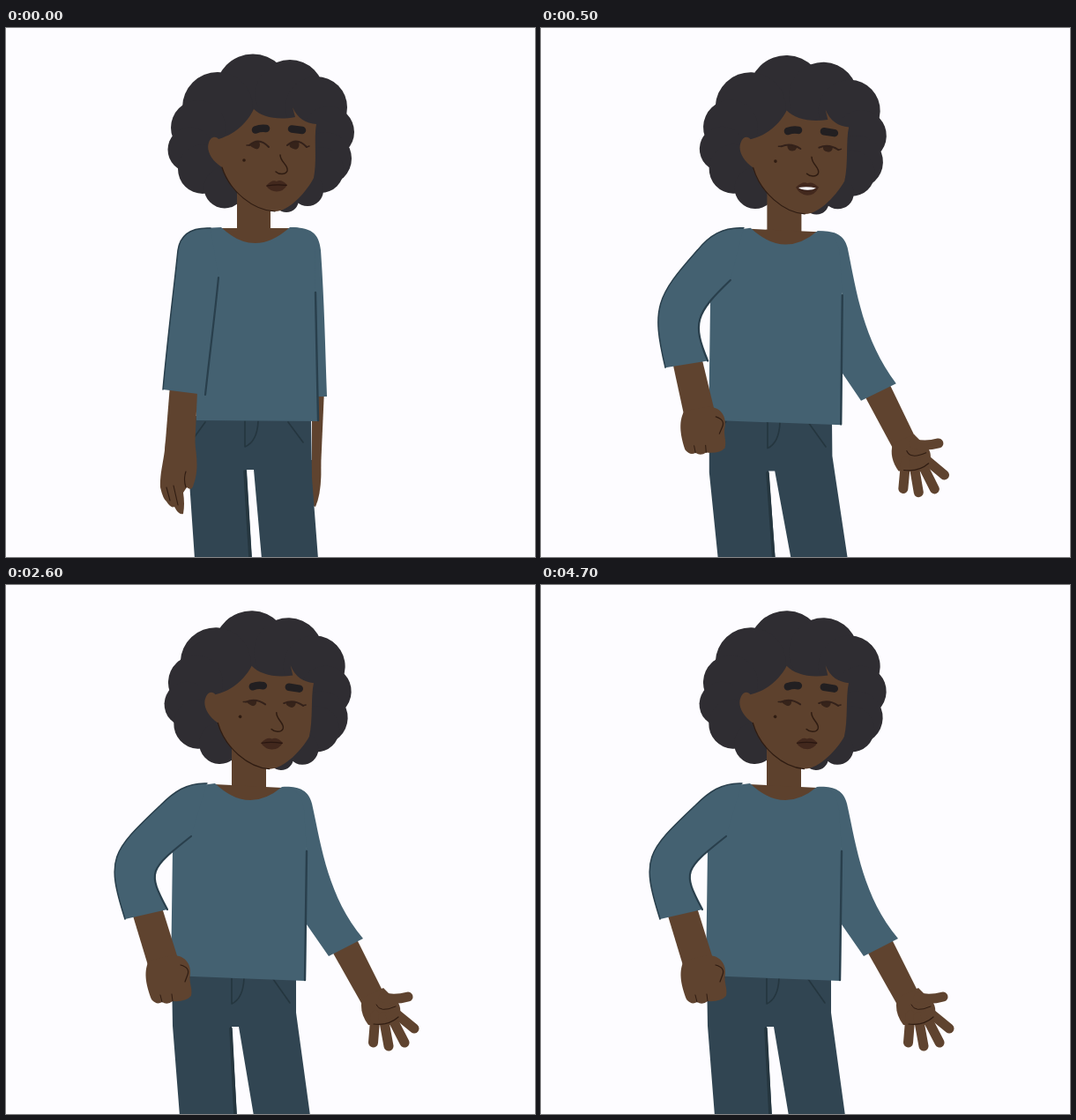
An HTML page that plays this animation: 600 px wide and 600 px high, repeating every 5.1 s.

```html
<!DOCTYPE html>
<html lang="en">
<head>
<meta charset="utf-8">
<title>Talking woman</title>
<style>
  html, body { margin: 0; width: 100%; height: 100%; overflow: hidden; background: #fdfcff; }
  svg { display: block; width: 100vw; height: 100vh; }
  path { stroke-linecap: round; stroke-linejoin: round; }
</style>
</head>
<body>
<svg id="stage" viewBox="0 0 600 600"></svg>
<script>
const LOOP = 5100, STEP = 100;
const HAIR = '#2f2d32', SKIN = '#5d412d', ARM = '#5f432f', SHIRT = '#446171', PANTS = '#314552';
const SEAM = '#293f4c', CREASE = '#25363f', INK = '#2f1c12';

// Each part has three poses: standing, dipping, hand on hip.
const poses = {
  rArm: ['M347 410L361 410L357 500L347 500Z', 'M354 420L384 410L412 476L385 490Z', 'M369 414L398 402L429 464L404 476Z'],
  rSleeve: [
    'M322 226C345 226 355 232 357 252C361 310 362 360 364 418L354 418L353 380L351 300Z',
    'M316 235C336 236 346 239 350 253C357 300 364 350 394 412L351 430L345 417L345 308Z',
    'M313 229C331 228 343 232 347 248C357 292 364 352 405 401L366 421L341 385L341 300Z'],
  pants: [
    'M215 440L207 500L214 602L279 602L273 501L281 501L290 602L354 602L347 510L346 440Z',
    'M202 448L198 520L216 602L281 602L267 509L270 509L294 602L359 602L336 488L334 450Z',
    'M188 440L189 500L197 602L262 602L256 501L264 501L281 602L345 602L329 485L329 445Z'],
  legLine: ['M271 503L277 602', 'M265 511L279 602', 'M255 503L260 602'],
  leftPocket: ['M226 447L213 465', 'M217 453L202 471', 'M208 445L190 466'],
  fly: ['M271 446L271 475Q285 469 286 446', 'M261 454L261 483Q274 477 275 454', 'M256 446L256 475Q269 469 270 446'],
  rightPocket: ['M320 447L337 470', 'M310 457L327 479', 'M303 447L322 474'],
  neck: ['M262 175L300 175L300 240L262 240Z', 'M258 183L297 183L297 248L258 248Z', 'M256 175L295 175L295 240L256 240Z'],
  collar: ['M243 227Q282 263 323 227Z', 'M239 235Q280 269 317 236Z', 'M236 226Q275 262 314 230Z'],
  torso: [
    'M244 226L225 227L212 300L216 445L355 446L351 300L350 250C348 232 340 226 322 226Q282 262 244 226Z',
    'M240 234L220 237L205 300L203 452L345 455L345 308L342 255C340 241 332 236 316 235Q280 268 240 234Z',
    'M237 225L215 228L189 300L187 443L340 449L341 300L338 255C336 238 328 229 313 229Q275 261 237 225Z'],
  side: ['M351 300L354 445', 'M345 308L345 454', 'M341 302L339 448'],
  lArm: ['M186 405L217 412L214 480L180 480Z', 'M174 408L205 412L203 480L167 480Z', 'M143 372L177 366L197 430L163 438Z'],
  lOuter: [
    'M232 227C212 226 198 232 195 252C190 300 184 345 178 410',
    'M238 234C208 231 192 240 189 258C178 310 172 345 165 410',
    'M228 225C205 224 190 235 175 250C119 303 113 310 135 379'],
  lInner: [
    'M226 416C231 370 237 325 241 283',
    'M214 416C217 375 225 330 234 290',
    'M183 368C160 325 162 323 210 285'],
  head: ['0 0 0', '-2.5 8.5 .6', '-3 0 2'],
  openHand: ['-70 42 40', '-25.5 17.5 3', '0 0 0'],
  sideHand: ['0 0 0', '50 -15 -20', '50 -15 -20'],
  fist: ['10 44 14', '-2 46 14', '0 0 0'],
  hang: ['0 0 0', '-12 3 0', '-12 3 0']
};

// [step, pose position]
const moves = [[0, 0], [1, .2], [2, .65], [3, 1], [4, 1.45], [5, 1.8], [6, 1.96],
  [7, 1.98], [8, 1.99], [10, 1.995], [11, 2]];
// [step, half width, opening]
const mouths = [[0, 12, 0], [2, 14, 3], [3, 15, 5], [4, 14, 4], [5, 13, 2], [6, 12, 0],
  [14, 13, 3], [15, 15, 5], [16, 13, 7], [17, 14, 4], [18, 16, 2], [19, 14, 5],
  [20, 13, 6], [21, 13, 7], [22, 14, 5], [23, 15, 3], [24, 13, .8], [26, 12.5, .3], [28, 12, 0],
  [30, 14, 1.5], [31, 16, 2.5], [32, 16, 2], [33, 15, 4], [34, 13, 7], [35, 14, 5],
  [36, 13, 6], [37, 13, 7], [38, 14, 5], [39, 15, 3], [40, 14, 2], [41, 13, 1],
  [42, 13, .7], [43, 12.5, .5], [45, 12, .2], [47, 12, 0]];

const svg = document.getElementById('stage');
function add(tag, attrs, parent = svg) {
  const el = document.createElementNS('http://www.w3.org/2000/svg', tag);
  for (const k in attrs) el.setAttribute(k, attrs[k]);
  return parent.appendChild(el);
}
const group = (parent) => add('g', {}, parent);
const fill = (color, parent, d = '') => add('path', { d, fill: color }, parent);
const line = (color, width, parent, d = '') =>
  add('path', { d, fill: 'none', stroke: color, 'stroke-width': width }, parent);
const dot = (cx, cy, r, color, parent) => add('circle', { cx, cy, r, fill: color }, parent);

const el = {};
el.rArm = fill(ARM);

const sideHand = group();
fill(ARM, sideHand, 'M345 490L357 490Q359 525 351 543L343 540Z');

const openHand = group();
fill(ARM, openHand, 'M404 468Q400 485 411 499L441 499Q451 485 445 474L428 457Z');
for (const d of ['M419 488L416.500 519', 'M428 490L434 523', 'M436 488L452 519', 'M441 485L463 503'])
  line(ARM, 11, openHand, d);
line(ARM, 11, openHand, 'M428 468Q442 471 456 467');
line(INK, 1.2, openHand, 'M417 498Q434 500 445 490');
line(INK, 1, openHand, 'M420 476Q424 486 442 478');

el.rSleeve = fill(SHIRT);
el.pants = fill(PANTS);
el.legLine = line(CREASE, 3.5);
for (const k of ['leftPocket', 'fly', 'rightPocket']) el[k] = line(CREASE, 1.6);

const hair = group();
add('ellipse', { cx: 290, cy: 120, rx: 80, ry: 62, fill: HAIR }, hair);
[[280, 72, 42.5], [322, 75, 39], [352, 90, 35], [366, 118, 29], [362, 148, 30], [357, 161, 26],
 [342, 184, 18], [318, 195, 14], [240, 90, 40], [218, 113, 31], [209, 138, 25.5], [223, 160, 28],
 [248, 181, 23.5]].forEach(([x, y, r]) => dot(x, y, r, HAIR, hair));

el.neck = fill(SKIN);
el.collar = fill(SKIN);
el.torso = fill(SHIRT);
el.side = line(SEAM, 2.4);
el.lArm = fill(ARM);

const hang = group();
fill(ARM, hang, 'M181 468C180 488 174 505 175 521Q178 534 182 537Q187 545 191 543Q196 553 201 551Q203 540 201 527L205 521Q211 526 213 517C219 500 216 485 214 468Z');
line(INK, 1.1, hang, 'M182 521L186 536');
line(INK, 1.1, hang, 'M190 519L195 541');
line(INK, 1.1, hang, 'M204 503Q201 512 204 521');

const fist = group();
fill(ARM, fist, 'M162 426C155 440 160 457 165 470Q171 477 177 473Q183 477 189 472Q204 473 210 466C212 457 207 452 209 441C210 428 201 419 188 420Z');
line(INK, 1.2, fist, 'M198 431Q209 434 206 442L203 450');
line(INK, 1, fist, 'M177 473L175 465');
line(INK, 1, fist, 'M189 472L188 464');

const lSleeve = fill(SHIRT);
el.lOuter = line(SEAM, 1.5);
el.lInner = line(SEAM, 2.2);

const face = group();
const skin = fill(SKIN, face), jaw = line(INK, 1.2, face);
dot(270, 150, 1.8, INK, face);
line('#221f21', 8.5, face, 'M283 115.500Q289 113 295 114');
line('#221f21', 8.5, face, 'M324 114.500L336 116');
line(INK, 1.5, face, 'M311 144C311 152 321 156 319 162C317 167 309 166 306 163');

function makeEye(id, left, wing) {
  const g = group(face);
  const clip = add('path', {}, add('clipPath', { id }, g));
  const iris = add('circle', { cy: 132.5, r: 5.5, fill: '#36231a', 'clip-path': `url(#${id})` }, g);
  const lid = line('#33211a', 2, g);
  line('#33211a', 1.5, g, wing);
  return (lidY, look) => {
    const top = `M${left} 133Q${left + 11} ${lidY} ${left + 22} 135`;
    lid.setAttribute('d', top);
    clip.setAttribute('d', top + `Q${left + 11} 142 ${left} 133Z`);
    iris.setAttribute('cx', left + look);
  };
}
const eyes = [makeEye('lidL', 276, 'M276 133L273 133'), makeEye('lidR', 319, 'M341 135L344 134')];

const lips = fill('#42281d', face), gap = fill('#38201a', face);
const teeth = fill('#fdfcff', face);
const lipLine = line('#291610', 1.2, face);

const NUM = /-?\d*\.?\d+/g;
function mix(list, u) {
  const i = Math.min(1, Math.floor(u)), k = u - i;
  const next = list[i + 1].match(NUM);
  let n = 0;
  return list[i].replace(NUM, (a) => +(+a + (next[n++] - a) * k).toFixed(2));
}
const at = (table, step) => table.filter((row) => row[0] <= step).pop();

function place(node, key, u, x, y) {
  const [dx, dy, turn] = mix(poses[key], u).split(' ');
  node.setAttribute('transform', `translate(${dx} ${dy}) rotate(${turn} ${x} ${y})`);
}
const show = (node, on) => node.setAttribute('visibility', on ? 'visible' : 'hidden');

function drawMouth(w, open) {
  const c = 307, y = 178, l = c - w, r = c + w, low = y + 7.5 + open;
  lips.setAttribute('d', `M${l} ${y + 1}Q${c - 5} ${y - 7} ${c} ${y - 4}Q${c + 5} ${y - 7} ${r} ${y}` +
    `Q${c + w * .65} ${low} ${c} ${low}Q${c - w * .6} ${low} ${l} ${y + 1}Z`);
  lipLine.setAttribute('d', `M${l + 1} ${y + 1}Q${c} ${y - 1} ${r - 1} ${y + .4}`);
  show(lipLine, open < 1);
  show(teeth, open >= 1);
  show(gap, open >= 1);
  const bite = (depth) => `M${l + 3} ${y + 1}Q${c} ${y - 1} ${r - 3} ${y + 1}` +
    `Q${c + w * .5} ${y + depth} ${c} ${y + depth}Q${c - w * .5} ${y + depth} ${l + 3} ${y + 1}Z`;
  gap.setAttribute('d', bite(open + 3));
  teeth.setAttribute('d', bite(Math.min(6, open + 1.5)));
  const drop = Math.min(3, open * .4), chin = 208 + drop;
  skin.setAttribute('d', 'M241 126C262 120 275 105 281 92C290 101 308 105 328 101L325 90' +
    `C331 103 340 108 352 109C349 125 353 150 349 170C342 184 322 ${chin} 305 ${chin}` +
    `C281 ${chin - 1} 254 186 245 158C232 150 227 138 230 130C232 123 238 122 241 126Z`);
  jaw.setAttribute('d', `M245 158C254 186 281 ${chin - 1} 305 ${chin}`);
}

function draw(step) {
  const u = at(moves, step)[1];
  for (const k in el) el[k].setAttribute('d', mix(poses[k], u));
  lSleeve.setAttribute('d', mix(poses.lOuter, u) + mix(poses.lInner, u).replace('M', 'L') + 'Z');
  place(hair, 'head', u, 288, 110);
  place(face, 'head', u, 288, 110);
  place(openHand, 'openHand', u, 416, 465);
  place(sideHand, 'sideHand', u, 352, 490);
  place(fist, 'fist', u, 184, 445);
  place(hang, 'hang', u, 197, 475);
  const raised = step >= 2;
  show(openHand, raised);
  show(fist, raised);
  show(sideHand, !raised);
  show(hang, !raised);
  const lid = raised ? 128 : 123;
  const aside = step >= 14 || !raised;
  eyes[0](lid, aside ? 6.5 : 12.5);
  eyes[1](lid, aside ? 8 : 10);
  drawMouth(...at(mouths, step).slice(1));
}

let last = -1;
function tick() {
  const step = Math.floor((performance.now() % LOOP) / STEP);
  if (step !== last) draw(last = step);
  requestAnimationFrame(tick);
}
tick();
</script>
</body>
</html>
```
